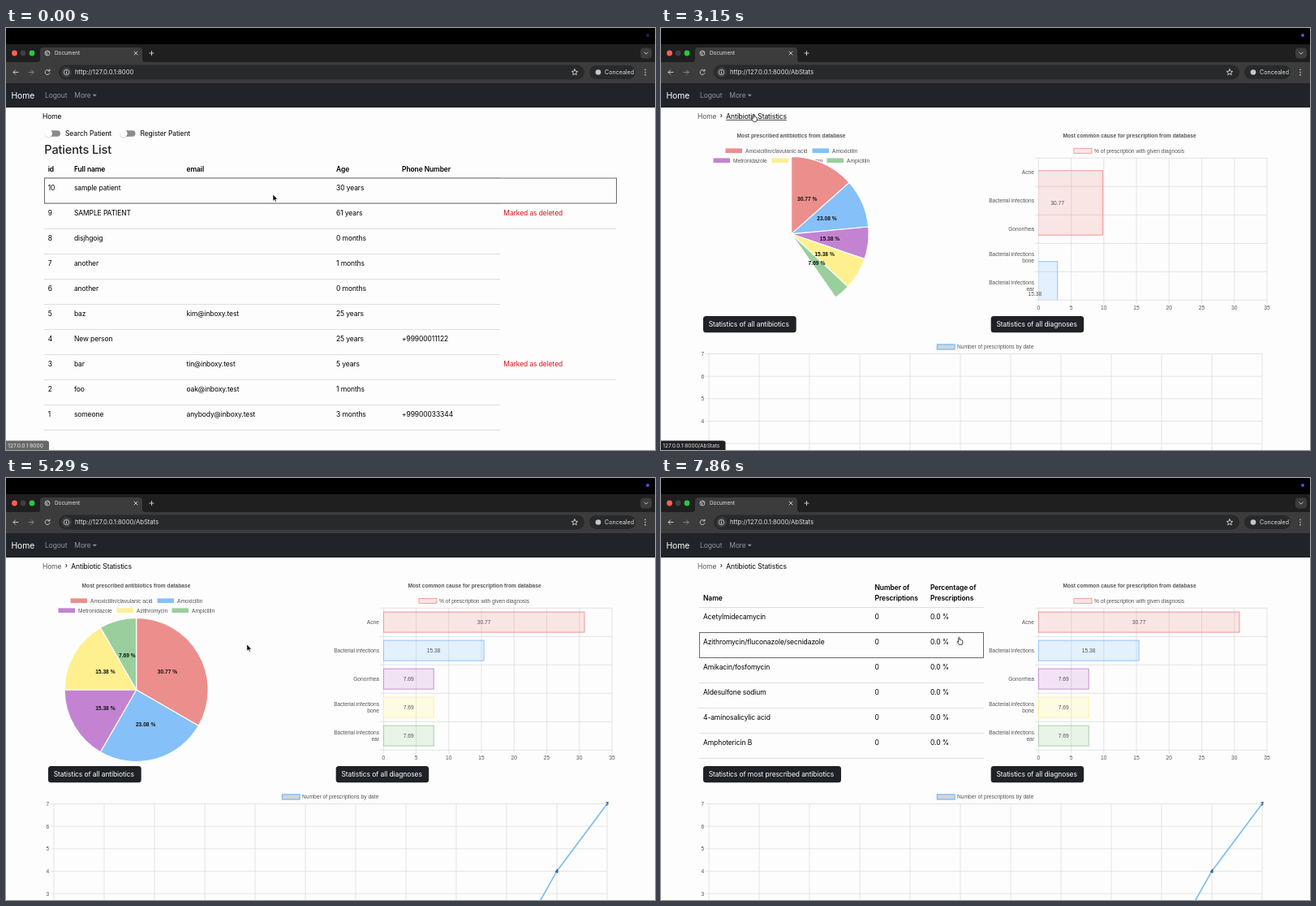
Animation of 800 by 520 pixels, one loop 8 s. Source, as an HTML page:

```html
<!DOCTYPE html>
<html lang="en">
<head>
<meta charset="utf-8">
<title>Patient records</title>
<style>
html, body { margin: 0; width: 100%; height: 100%; overflow: hidden; background: #000; }
svg { display: block; width: 800px; height: 520px; }
text { font: 8.5px Inter, Roboto, sans-serif; letter-spacing: -.1px; fill: #000; white-space: pre; }
.bold { font-weight: 600; }
.title { font-size: 14.55px; font-weight: 500; letter-spacing: -.15px; fill: #212529; }
.brand { font-size: 10.4px; fill: #fff; }
.nav { fill: #929497; }
.light { fill: #dee2e6; }
.white { fill: #fff; }
.red { fill: #d4141c; }
.tab { font-size: 6.4px; letter-spacing: 0; fill: #e3e3e3; }
.status { font-size: 6.6px; letter-spacing: 0; fill: #e3e3e3; }
.url { font-size: 7.75px; letter-spacing: -.05px; fill: #e3e3e3; }
.chip { font-size: 7.1px; letter-spacing: 0; fill: #e3e3e3; }
.chart { font: 6.67px "Liberation Sans", Arial, sans-serif; letter-spacing: 0; fill: #555; }
.heavy { font-weight: 700; }
.dark { fill: #111; }
.mid { text-anchor: middle; }
.end { text-anchor: end; }
.rule { stroke: #dcdee0; fill: none; }
.grid { stroke: #dedede; stroke-width: .8; fill: none; }
.icon { stroke: #c7c7c7; fill: none; stroke-width: 1; stroke-linecap: round; stroke-linejoin: round; }
.hover { fill: none; stroke: #5c5c5c; stroke-width: .9; }
</style>
</head>
<body>
<svg id="stage" viewBox="0 0 800 520"></svg>
<script>
const LOOP = 8000, OPEN_MENU = 1290, NAVIGATE = 2930, SHOW_TABLE = 7130;
const PIE_START = 3030, LINE_START = 3170;

const text = (x, y, s, cls = '') => `<text x="${x}" y="${y}" class="${cls}">${s}</text>`;
const rect = (x, y, w, h, fill, rx = 0, more = '') =>
  `<rect x="${x}" y="${y}" width="${w}" height="${h}" fill="${fill}" rx="${rx}" ${more}/>`;
const path = (d, cls = '', more = '') => `<path d="${d}" class="${cls}" ${more}/>`;
const circle = (x, y, r, fill, more = '') => `<circle cx="${x}" cy="${y}" r="${r}" fill="${fill}" ${more}/>`;
const group = (id, body, more = '') => `<g id="${id}" ${more}>${body}</g>`;
const mix = (a, b, p) => a + (b - a) * p;
const clamp = v => Math.max(0, Math.min(1, v));
const smooth = v => v * v * (3 - 2 * v);
const outQuart = ms => 1 - (1 - clamp(ms / 1000)) ** 4;

const COLORS = ['#ec8e8c', '#85c0f8', '#c383d2', '#fff08f', '#9acf9d'];
const SHARES = [30.77, 23.08, 15.38, 15.38, 7.69];
const CAUSES = [30.77, 15.38, 7.69, 7.69, 7.69];

const browser = () =>
  rect(0, 0, 800, 20, '#000') + rect(0, 20, 800, 23, '#1f1f20') +
  circle(10.5, 31, 3.4, '#ff5f57') + circle(21, 31, 3.4, '#3f3f41') + circle(32, 31, 3.4, '#28c840') +
  path('M39 42Q42 42 42 38V28Q42 24 46 24H164Q168 24 168 28V38Q168 42 171 42Z', '', 'fill="#3c3c3c"') +
  rect(0, 42, 800, 26, '#3c3c3c') +
  circle(51, 31, 3, 'none', 'stroke="#c7c7c7" stroke-width=".9"') +
  path('M48.5 30L51 31L50 33.5M51 28.5L53 30.5', 'icon', 'stroke-width=".8"') +
  text(60, 33.3, 'Document', 'tab') +
  path('M158 29L162 33M162 29L158 33M177 31H182M179.5 28.5V33.5', 'icon') +
  rect(782, 24.5, 14, 13, '#3c3c3c', 4) + path('M786.8 30L789 32.2L791.2 30', 'icon') +
  path('M15 54.5H9M11.6 51.8L9 54.5L11.6 57.2', 'icon') +
  path('M28 54.5H34M31.4 51.8L34 54.5L31.4 57.2', 'icon', 'style="stroke:#858585"') +
  path('M53.6 52.8A3 3 0 1 0 54 55.5M54 51V53H52', 'icon') +
  rect(65, 45.5, 648, 18, '#28292a', 9) + circle(74.5, 54.5, 6.4, '#3c3c3c') +
  circle(74.5, 54.5, 3.2, 'none', 'stroke="#c7c7c7" stroke-width=".9"') +
  path('M74.5 54.3V56M74.5 52.8V52.9', 'icon') +
  path('M701 50.8L702.1 53.2L704.7 53.5L702.7 55.2L703.3 57.8L701 56.4L698.7 57.8L699.3 55.2L697.3 53.5L699.9 53.2Z', 'icon', 'stroke-width=".9"') +
  rect(719, 46, 57, 17, '#28292a', 8.5) + circle(730, 54.5, 3.3, '#c7c7c7') +
  text(738, 57.2, 'Concealed', 'chip') +
  [51.3, 54.5, 57.7].map(y => circle(788, y, .85, '#c7c7c7')).join('') +
  text(85, 57.3, '', 'url').replace('<text', '<text id="url"') +
  circle(791, 9, 2, '#5a50d8', 'id="recording"');

const navbar = () => rect(0, 68, 800, 30, '#202328') + text(6.5, 86.8, 'Home', 'brand') +
  text(48, 86, 'Logout', 'nav') +
  group('more', text(84.3, 86, 'More') + path('M106.8 81.8H111.8L109.3 84.4Z'), 'fill="#929497"');

const toggle = (x, label) => rect(x + 2, 126.3, 17, 7.4, '#8b8b8b', 3.7) +
  circle(x + 4.5, 130.7, 5, '#000', 'opacity=".14"') + circle(x + 4.5, 130, 4.7, '#fff') +
  text(x + 25, 133, label);

const PATIENTS = [
  ['sample patient', '', '30 years'], ['SAMPLE PATIENT', '', '61 years', '', true],
  ['disjhgoig', '', '0 months'], ['another', '', '1 months'], ['another', '', '0 months'],
  ['baz', 'kim@inboxy.test', '25 years'], ['New person', '', '25 years', '+99900011122'],
  ['bar', 'tin@inboxy.test', '5 years', '', true], ['foo', 'oak@inboxy.test', '1 months'],
  ['someone', 'anybody@inboxy.test', '3 months', '+99900033344']
];

function patients() {
  const cells = (values, y, cls) =>
    [51.7, 83.2, 221.8, 407, 488].map((x, i) => {
      const cell = text(x, y, values[i] || '', cls);
      return i === 1 || i === 2 ? `<g class="shift">${cell}</g>` : cell;
    }).join('');
  const rows = PATIENTS.map((p, i) => {
    const top = 185 + i * 31, deleted = p[4];
    return cells([10 - i, ...p.slice(0, 4)], top + 14.5) +
      path(`M47 ${top + 31.5}H${deleted ? 752 : 609}`, 'rule') +
      (deleted ? text(613.3, top + 45.3 - 31 + .2, 'Marked as deleted', 'red') : '');
  }).join('');
  return text(45, 111.8, 'Home') + toggle(48, 'Search Patient') + toggle(140.5, 'Register Patient') +
    text(47.3, 155.2, 'Patients List', 'title') +
    cells(['id', 'Full name', 'email', 'Age', 'Phone Number'], 177.2, 'bold') +
    path('M47 184.5H609', 'rule') + rows;
}

const menu = () => rect(81, 95.5, 97.5, 43, '#202328', 3.5, 'stroke="#3a3d41" stroke-width=".6"') +
  rect(81, 100, 97.5, 17.3, '#43464a', 0, 'id="menuHover"') +
  text(89.3, 111.6, 'Antibiotics Statistics', 'light') + text(89.3, 129, 'Patients Statistics', 'light');

const legend = (x, y, i, label) => rect(x, y - 2.8, 20.5, 5.6, COLORS[i]) + text(x + 24.5, y + 2.3, label, 'chart');

const pieFrame = () => text(160.5, 135.4, 'Most prescribed antibiotics from database', 'chart heavy mid') +
  legend(79.5, 151.2, 0, 'Amoxicillin/clavulanic acid') + legend(186.5, 151.2, 1, 'Amoxicillin') +
  legend(64.5, 163.2, 2, 'Metronidazole') + legend(136.5, 163.2, 3, 'Azithromycin') +
  legend(204.5, 163.2, 4, 'Ampicillin') + group('pie', '');

function barFrame() {
  let out = text(577.5, 135.4, 'Most common cause for prescription from database', 'chart heavy mid') +
    rect(509, 148.3, 22, 6, COLORS[0], 0, `fill-opacity=".22" stroke="${COLORS[0]}" stroke-width=".8"`) +
    text(534, 153.6, '% of prescription with given diagnosis', 'chart');
  for (let i = 0; i < 8; i++) {
    const x = 465.3 + i * 40.25;
    out += path(`M${x} 160V339.5`, 'grid') + text(x, 347, i * 5, 'chart mid');
  }
  for (let i = 0; i < 6; i++) out += path(`M461 ${160.3 + i * 35}H747`, 'grid');
  ['Acne', 'Bacterial infections', 'Gonorrhea', 'Bacterial infections|bone', 'Bacterial infections|ear']
    .forEach((name, i) => name.split('|').forEach((line, k, all) => {
      out += text(460, 180 + i * 35.1 + (k - (all.length - 1) / 2) * 8, line, 'chart end');
    }));
  return out + group('bars', '', 'clip-path="url(#barArea)"') + group('barLabels', '', 'clip-path="url(#barCanvas)"');
}

function lineFrame() {
  let out = rect(340.5, 390, 21.5, 6, '#d3d5d8', 0, `stroke="${COLORS[1]}" stroke-width="1.5"`) +
    text(365, 395.2, 'Number of prescriptions by date', 'chart');
  for (let i = 0; i < 12; i++) out += path(`M${59 + i * 62} 401V520`, 'grid');
  for (let i = 0; i < 5; i++) {
    const y = 401.5 + i * 27.65;
    out += path(`M55 ${y}H741`, 'grid') + text(53.3, y + 2.4, 7 - i, 'chart end');
  }
  return out + group('line', '', 'clip-path="url(#lineArea)"');
}

const button = (id, x, w, label) => group(id, rect(x, 355, w, 20.3, '#1e2125', 3.5) + text(x + 6.7, 368.2, label, 'white'));

const ANTIBIOTICS = ['Acetylmidecamycin', 'Azithromycin/fluconazole/secnidazole', 'Amikacin/fosfomycin',
  'Aldesulfone sodium', '4-aminosalicylic acid', 'Amphotericin B'];

const antibiotics = () => text(52, 151, 'Name', 'bold') +
  text(263.5, 138, 'Number of', 'bold') + text(263.5, 151, 'Prescriptions', 'bold') +
  text(332, 138, 'Percentage of', 'bold') + text(332, 151, 'Prescriptions', 'bold') +
  path('M47 159.5H398', 'rule') +
  ANTIBIOTICS.map((name, i) => {
    const y = 173.6 + i * 31;
    return text(52, y, name) + text(263.5, y, '0') + text(332, y, '0.0 %') + path(`M47 ${y + 16.9}H398`, 'rule');
  }).join('') + button('', 52, 170, 'Statistics of most prescribed antibiotics');

const stats = () => text(45, 111.8, 'Home', 'crumb').replace('<text', '<text style="fill:#555"') +
  text(72.8, 111.2, '›') + text(80.3, 111.8, 'Antibiotic Statistics') +
  path('M80.3 113.4H154.8', '', 'id="underline" stroke="#000" stroke-width=".7"') +
  group('pieView', pieFrame() + button('allAntibiotics', 52, 114.7, 'Statistics of all antibiotics')) +
  group('tableView', antibiotics()) + barFrame() +
  button('', 406.7, 114.5, 'Statistics of all diagnoses') + lineFrame();

const cursors = () => group('cursor',
  path('M0 0V8.2L1.9 6.5L3.1 9.2L4.4 8.6L3.2 6H5.8Z', '', 'id="arrow" fill="#000" stroke="#fff" stroke-width=".6"') +
  path('M-.8 .8Q0 -.5 .8 .8V3.6L1.4 3.3Q2 3.2 2.3 3.8Q3.1 3.4 3.4 4.2Q4.4 4 4.4 5V6.6Q4.4 8 3.6 9.3H-.2Q-.8 8.2 -2.4 6.4Q-2.9 5.5 -1.9 5.3L-.8 6.2Z',
    '', 'id="hand" fill="#fff" stroke="#000" stroke-width=".75" stroke-linejoin="round"'));

const clip = (id, x, y, w, h) => `<clipPath id="${id}"><rect x="${x}" y="${y}" width="${w}" height="${h}"/></clipPath>`;
const stage = document.getElementById('stage');
stage.innerHTML = clip('barArea', 465, 160, 283, 175) + clip('barCanvas', 400, 125, 352, 226) +
  clip('lineArea', 57, 398, 686.5, 122) +
  rect(0, 68, 800, 452, '#fdfdfd') + browser() + group('patients', patients()) + group('stats', stats()) +
  rect(47.5, 0, 1, 31, 'none', 0, 'id="rowHover" class="hover"') + navbar() + group('menu', menu()) +
  group('status', path('', '', 'fill="#202124"') + text(2.3, 516.9, '', 'status')) + cursors();

const el = id => document.getElementById(id);
const show = (id, on) => { el(id).style.display = on ? '' : 'none'; };

// Cursor stops: time, x, y
const STOPS = [[0, 329, 205], [200, 329, 205], [1100, 104.5, 82.5], [1500, 104.5, 82.5], [2200, 114, 106],
  [3950, 114, 106], [4450, 329, 177], [5000, 329, 177], [6200, 112, 366], [7200, 112, 366],
  [7720, 367.5, 196], [LOOP, 367.5, 196]];

function cursorAt(t) {
  const i = STOPS.findIndex(s => s[0] > t), [t0, x0, y0] = STOPS[i - 1], [t1, x1, y1] = STOPS[i];
  const p = smooth((t - t0) / (t1 - t0));
  return [mix(x0, x1, p), mix(y0, y1, p)];
}

function drawPie(p) {
  const cy = mix(249, 261, p), r = mix(100, 88.5, p), total = SHARES.reduce((a, b) => a + b);
  const at = (angle, dist) => `${160.7 + dist * Math.sin(angle)} ${cy - dist * Math.cos(angle)}`;
  let angle = 0, slices = '', labels = '';
  SHARES.forEach((share, i) => {
    const next = angle + share / total * 2 * Math.PI * p;
    slices += path(`M160.7 ${cy}L${at(angle, r)}A${r} ${r} 0 0 1 ${at(next, r)}Z`, '',
      `fill="${COLORS[i]}" stroke="#fff" stroke-width="1.1" stroke-linejoin="bevel"`);
    const [x, y] = at((angle + next) / 2, r / 2).split(' ').map(Number);
    if (p) labels += text(x, y + 2.4, share.toFixed(2) + ' %', 'chart heavy dark mid');
    angle = next;
  });
  el('pie').innerHTML = slices + labels;
}

function drawBars(p) {
  let bars = '', labels = '';
  CAUSES.forEach((v, i) => {
    const left = mix(411, 465.3, p), right = mix(411 + v * .65, 465.3 + v * 8.05, p);
    const mid = mix(241 + i * 164, 177.6 + i * 35, p), h = mix(116, 25, p);
    bars += rect(left, mid - h / 2, right - left, h, COLORS[i], 0,
      `fill-opacity=".22" stroke="${COLORS[i]}" stroke-width=".9"`);
    if (p) labels += text((left + right) / 2, mid + 2.4, v, 'chart mid');
  });
  el('bars').innerHTML = bars;
  el('barLabels').innerHTML = labels;
}

function drawLine(p) {
  const points = [[617, 0], [679, 4], [741, 7]].map(([x, v]) =>
    [mix(59 + (x - 59) * 2.6, x, p), mix(620, 595, p) - v * 27.65, v]);
  el('line').innerHTML = path('M' + points.map(q => q.slice(0, 2)).join('L'), '',
      `fill="none" stroke="#7fbdf2" stroke-width="1.7"`) +
    points.slice(1).map(([x, y, v]) => circle(x, y, 1.9, '#7fbdf2') + text(x, y + 2.4, v, 'chart dark mid')).join('');
}

function drawStatus(t) {
  const [label, width, opacity] = t < 900 ? ['', 53, .68 * clamp(1 - t / 300)] :
    t < 1700 ? ['/#', 59.5, clamp((t - 950) / 150)] : ['/AbStats', 79.5, clamp((4400 - t) / 200)];
  const [shape, caption] = el('status').children;
  shape.setAttribute('d', `M0 508.5H${width - 3}Q${width} 508.5 ${width} 511.5V520H0Z`);
  caption.textContent = '127.0.0.1:8000' + label;
  el('status').style.opacity = opacity;
}

function render(t) {
  const [x, y] = cursorAt(t), onStats = t >= NAVIGATE, table = t >= SHOW_TABLE;
  const within = (x0, y0, x1, y1) => x >= x0 && x <= x1 && y >= y0 && y <= y1;
  const onMore = within(82, 76, 114, 92), menuOpen = t >= OPEN_MENU && !onStats;
  const onItem = menuOpen && within(81, 98, 178, 117);
  const onCrumb = onStats && within(80, 103, 155, 114);
  const onButton = onStats && !table && within(52, 355, 167, 375);
  const onRow = onStats ? table && within(47, 159, 398, 345) : within(47, 185, 752, 495);

  show('patients', !onStats);
  show('stats', onStats);
  show('pieView', !table);
  show('tableView', table);
  show('menu', menuOpen);
  show('menuHover', onItem);
  show('underline', onCrumb);
  el('url').textContent = 'http://127.0.0.1:8000' + (onStats ? '/AbStats' : '');
  el('recording').style.opacity = mix(.4, 1, clamp(t / 900));

  const moreColor = onMore || menuOpen ? '#c9cacc' : '#929497';
  for (const part of el('more').children) part.style.fill = moreColor;
  el('allAntibiotics').firstChild.style.fill = onButton ? '#404348' : '';

  show('rowHover', onRow);
  const top = onStats ? 159.5 : 185;
  el('rowHover').setAttribute('y', top + Math.floor((y - top) / 31) * 31);
  el('rowHover').setAttribute('width', onStats ? 350 : 705);
  const nudge = onRow && !onStats ? 'translate(.7)' : '';
  document.querySelectorAll('.shift').forEach(g => g.setAttribute('transform', nudge));

  if (onStats) {
    const p = outQuart(t - PIE_START);
    drawPie(p);
    drawBars(p);
    drawLine(outQuart(t - LINE_START));
  }
  drawStatus(t);

  const pointing = onMore || onItem || onCrumb || onButton || (onStats && (onRow || (table && y > 340)));
  show('hand', pointing);
  show('arrow', !pointing);
  el('cursor').setAttribute('transform', `translate(${x} ${y})`);
}

const start = performance.now();
function tick() {
  render((performance.now() - start) % LOOP);
  requestAnimationFrame(tick);
}
tick();
</script>
</body>
</html>
```
